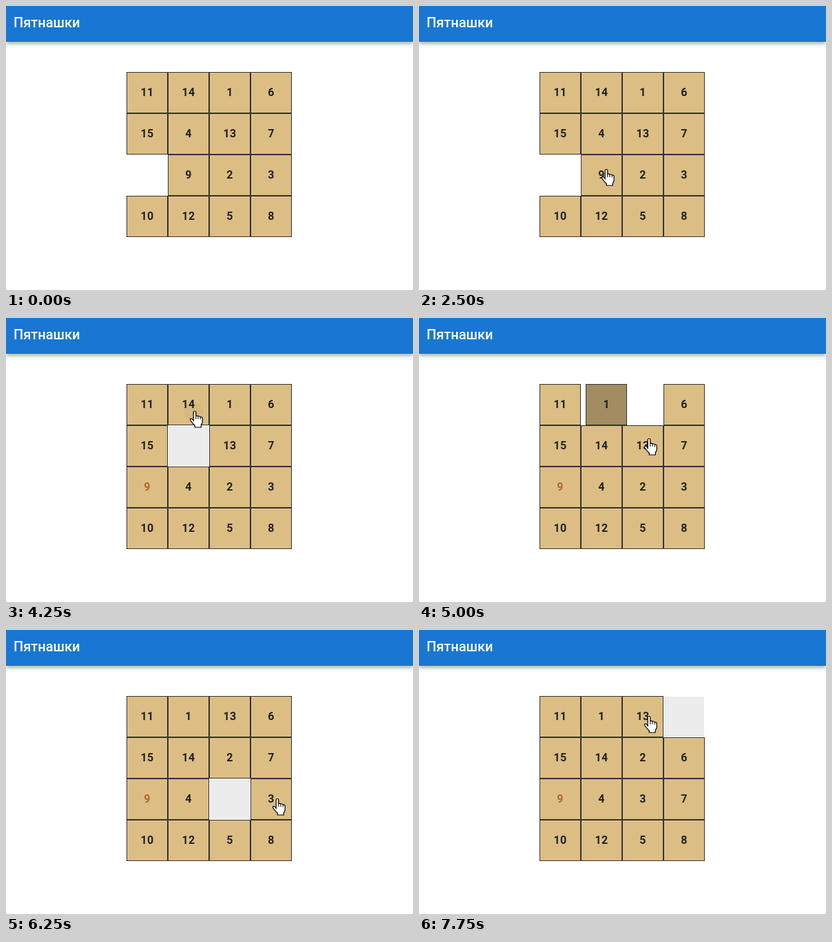
Recreate the animation shown at these times as an HTML page. Size 591 px wide and 413 px high, loop 8000 ms.

```html
<!DOCTYPE html>
<html lang="ru">
<head>
<meta charset="utf-8">
<style>
html, body { margin: 0; width: 100%; height: 100%; overflow: hidden; background: #fff; font-family: Roboto, sans-serif; }
header {
  position: absolute; left: 0; right: 0; top: 0; height: 52px; box-sizing: border-box; padding-left: 11px;
  background: #1976d2; color: #fff; font-weight: 500; font-size: 20px; line-height: 48px;
  box-shadow: 0 2px 4px -1px rgba(0,0,0,.2), 0 4px 5px rgba(0,0,0,.14), 0 1px 10px rgba(0,0,0,.12);
}
#board { position: absolute; left: 175px; top: 96px; }
#board div {
  position: absolute; width: 60px; height: 60px; box-sizing: border-box; border: 1px solid #333;
  background: #dcbe84; color: #222; font-weight: 600; font-size: 16px; line-height: 58px; text-align: center;
  letter-spacing: .3px;
}
#board .blank { border-color: #fff; background: #fff; }
#board .fresh { background: #ececec; }
#board .moving { background: #a38c62; z-index: 1; }
#board .placed { color: #b0692a; }
#board .pressed { background: radial-gradient(circle at 36px 40px, #d7b87e 13px, #dcbe84 15px); }
svg { position: absolute; left: 0; top: 0; overflow: visible; fill: #fff; stroke: #000; stroke-linejoin: round; }
</style>
</head>
<body>
<header>Пятнашки</header>
<div id="board"></div>
<svg width="1" height="1">
  <path id="arrow" d="M.5 .5V16.5L4.2 13 6.7 18.7 9 17.7 6.6 12.2H11.5Z"/>
  <g id="hand">
    <path stroke-width="1.2" d="M-1.8 15V1.8Q-1.8 .5 0 .5T1.8 1.8V7.5Q3.5 6.3 5 8Q7 7.2 8.2 9Q11 8.6 11.2 11V16.5Q11 18.5 9.3 20.5V24H.3V21.5Q-3.5 18-6.2 13.8Q-7 12-5.5 11.4Q-4 11-1.8 14Z"/>
    <path fill="none" d="M1.8 7.5V12M5 8V12M8.2 9V12.5"/>
  </g>
</svg>
<script>
const STEP = 250, LOOP = 8000, SLIDE = 200, TRAVEL = 120, PRESS = 150;
const SIZE = 60, LEFT = 175, TOP = 96, BOTTOM = TOP + 4 * SIZE;
const start = [11, 14, 1, 6, 15, 4, 13, 7, 0, 9, 2, 3, 10, 12, 5, 8];
// tile and click time
const clicks = [
  [9, 3150], [4, 3900], [14, 4400], [1, 4870], [13, 5370],
  [2, 5870], [3, 6420], [7, 7115], [6, 7410], [13, LOOP]
];
const $ = id => document.getElementById(id);
const col = cell => cell % 4, row = cell => cell >> 2;
const clamp = p => Math.min(1, Math.max(0, p));
const easeOut = p => 1 - (1 - p) ** 2;
const smooth = p => p * p * (3 - 2 * p);
const mix = (a, b, p) => a + (b - a) * p;

const cells = [...start];
const moves = clicks.map(([tile, at]) => {
  const from = cells.indexOf(tile), to = cells.indexOf(0);
  cells[from] = 0;
  cells[to] = tile;
  return { tile, at, from, to };
});

// Pointer legs: the approach, then from each clicked tile to the near side of the next
const legs = [{ at: 1000, time: 1250, x: 272, y: 237 }];
moves.slice(1).forEach(({ from }, i) => {
  const last = moves[i];
  legs.push({
    at: last.at, time: TRAVEL,
    x: LEFT + SIZE * col(from) + 39,
    y: TOP + SIZE * row(from) + 29 + 10 * Math.sign(row(last.from) - row(from))
  });
});

const tiles = start.map((_, n) => {
  const el = document.createElement('div');
  el.textContent = n || '';
  $('board').append(el);
  return el;
});

function drawBoard(t) {
  const pos = start.map((_, n) => {
    const cell = start.indexOf(n);
    return { x: col(cell), y: row(cell), name: n ? '' : 'blank' };
  });
  for (const { tile, at, from, to } of moves) {
    if (t < at) {
      if (at - t <= PRESS) pos[tile].name = 'pressed';
      break;
    }
    const p = easeOut(clamp((t - at) / SLIDE));
    const home = to === tile - 1 && col(to) === 0;
    pos[tile] = {
      x: mix(col(from), col(to), p), y: mix(row(from), row(to), p),
      name: p < 1 ? 'moving' : home ? 'placed' : ''
    };
    pos[0] = { x: col(from), y: row(from), name: p < 1 ? 'blank' : 'blank fresh' };
  }
  pos.forEach(({ x, y, name }, n) => {
    tiles[n].className = name;
    tiles[n].style.left = x * SIZE + 'px';
    tiles[n].style.top = y * SIZE + 'px';
  });
}

function drawPointer(t) {
  let x = 337, y = 385;
  for (const leg of legs) {
    const p = smooth(clamp((t - leg.at) / leg.time));
    x = mix(x, leg.x, p);
    y = mix(y, leg.y, p);
  }
  const shape = t < STEP ? '' : y < BOTTOM ? 'hand' : 'arrow';
  for (const id of ['hand', 'arrow']) {
    $(id).style.display = id === shape ? '' : 'none';
    $(id).setAttribute('transform', `translate(${x} ${y})`);
  }
}

const t0 = performance.now();
function tick() {
  const t = Math.floor((performance.now() - t0) % LOOP / STEP) * STEP;
  drawBoard(t);
  drawPointer(t);
  requestAnimationFrame(tick);
}
tick();
</script>
</body>
</html>
```
